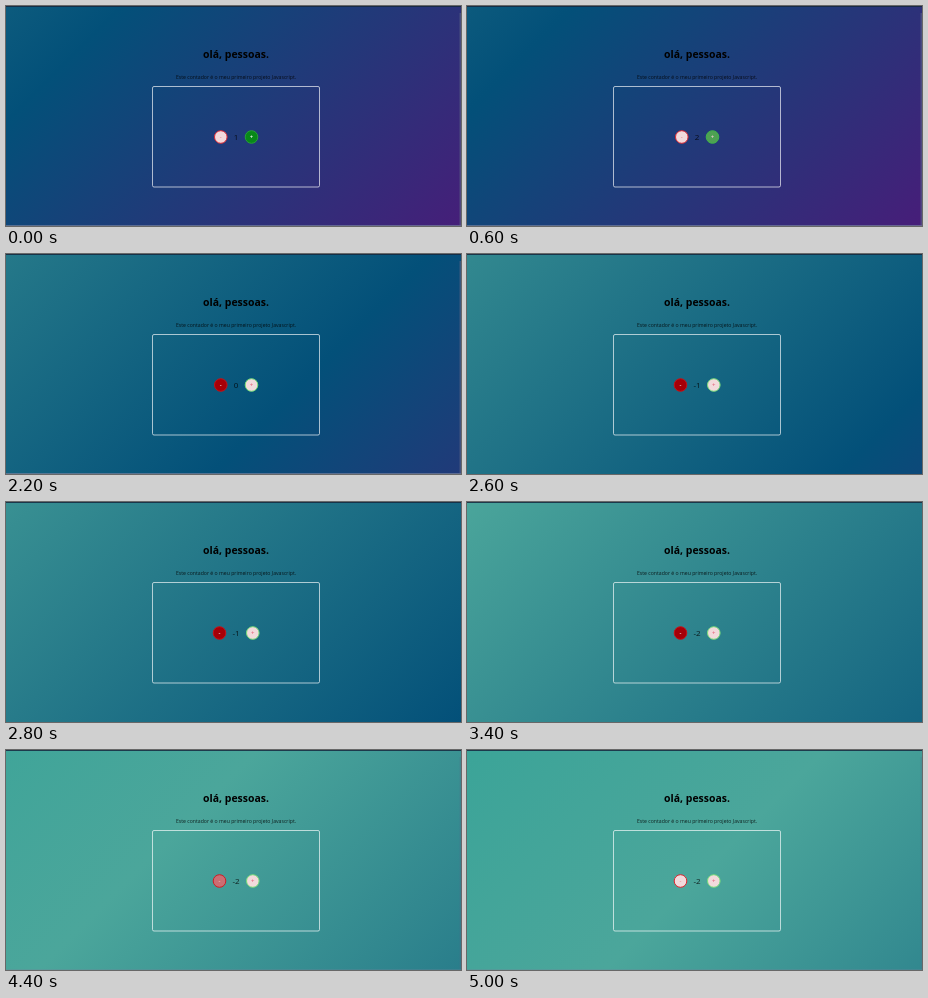
Recreate the animation shown at these times as an HTML page. Size 455 px wide and 220 px high, loop 5.2 s.

```html
<!DOCTYPE html>
<html lang="pt">
<head>
<meta charset="utf-8">
<style>
html, body { margin: 0; width: 100%; height: 100%; overflow: hidden; background: #0a5078; }
svg { display: block; width: 455px; height: 220px; }
text { font-family: "Open Sans", "Noto Sans", sans-serif; text-anchor: middle; }
</style>
</head>
<body>
<svg viewBox="0 0 455 220">
  <defs>
    <linearGradient id="sky" gradientUnits="userSpaceOnUse" x1="-900" y1="-900" x2="450" y2="450">
      <stop offset="0" stop-color="rgb(36,161,148)"/>
      <stop offset=".33333" stop-color="rgb(75,166,155)"/>
      <stop offset=".66667" stop-color="rgb(3,80,121)"/>
      <stop offset="1" stop-color="rgb(110,0,121)"/>
    </linearGradient>
  </defs>
  <rect width="455" height="220" fill="url(#sky)"/>
  <rect width="455" height="1" fill="#17283f" opacity=".85"/>
  <g id="edges">
    <rect y="219" width="455" height="1" fill="#77809c" opacity=".7"/>
    <rect x="453.5" y="7" width="1.5" height="212" fill="#5b6485" opacity=".6"/>
  </g>
  <text x="230" y="52" font-size="10.45" font-weight="700">olá, pessoas.</text>
  <text x="230" y="73.4" font-size="5.15" opacity=".8">Este contador é o meu primeiro projeto Javascript.</text>
  <rect x="146.5" y="80.5" width="167" height="100.5" rx="1.5" fill="none" stroke="#fff" stroke-opacity=".65"/>
  <text id="count" x="230" y="134" font-size="8" opacity=".8"></text>
  <g id="minus"><circle r="6.3"/><text y="2" font-size="6" font-weight="600">-</text></g>
  <g id="plus"><circle r="6.3"/><text y="2.1" font-size="6" font-weight="600">+</text></g>
</svg>
<script>
const LOOP = 5200, STEP = 200;
const SWING = 7500, TURN = 900;   // half period of the background and when it turns back
const $ = id => document.getElementById(id);
const counts = [[0, 1], [600, 2], [1800, 1], [2200, 0], [2600, -1], [3200, -2]];
const minusHover = [[1200, 0], [1400, .85], [1600, 1], [4200, 1], [4600, 0]];
const plusHover = [[0, 1], [400, 1], [600, .7], [800, 1], [1000, 1], [1300, 0]];

// CSS "ease": cubic-bezier(.25, .1, .25, 1)
function ease(x) {
  const curve = (a, b, s) => 3 * a * s * (1 - s) ** 2 + 3 * b * s * s * (1 - s) + s ** 3;
  let lo = 0, hi = 1;
  for (let i = 0; i < 24; i++) {
    const mid = (lo + hi) / 2;
    if (curve(.25, .25, mid) < x) lo = mid; else hi = mid;
  }
  return curve(.1, 1, lo);
}

function ramp(keys, t) {
  if (t <= keys[0][0]) return keys[0][1];
  for (let i = 1; i < keys.length; i++) {
    const [t0, a] = keys[i - 1], [t1, b] = keys[i];
    if (t <= t1) return a + (b - a) * (t - t0) / (t1 - t0);
  }
  return keys[keys.length - 1][1];
}

const mix = (a, b, k) => `rgb(${a.map((v, i) => Math.round(v + (b[i] - v) * k))})`;

function drawButton(id, x, hover, look) {
  const button = $(id), [disc, sign] = button.children;
  button.setAttribute("transform", `translate(${x} 131)`);
  disc.setAttribute("fill", mix([242, 218, 220], look.fill, hover));
  disc.setAttribute("stroke", mix(look.rim, look.hotRim, hover));
  sign.setAttribute("fill", mix(look.sign, [255, 255, 255], hover));
}

const red = { fill: [166, 0, 8], rim: [222, 38, 48], hotRim: [196, 18, 24], sign: [232, 140, 145] };
const green = { fill: [8, 136, 24], rim: [120, 222, 120], hotRim: [38, 160, 54], sign: [228, 105, 125] };

function draw(t) {
  const swing = t < TURN ? 1 - ease((t - TURN + SWING) / SWING) : ease((t - TURN) / SWING);
  const shift = (105 + 1365 * swing) / 2;
  $("sky").setAttribute("gradientTransform", `translate(${shift} ${shift})`);

  const value = counts.filter(c => c[0] <= t).pop()[1];
  $("count").textContent = value;
  const gap = value < 0 ? 16.5 : 15.2;
  drawButton("minus", 230 - gap, ramp(minusHover, t), red);
  drawButton("plus", 230.3 + gap, ramp(plusHover, t), green);
  $("edges").setAttribute("opacity", t < 2600 ? 1 : t < 4200 ? 0 : .4);
}

const start = performance.now();
function tick() {
  const t = (performance.now() - start) % LOOP;
  draw(Math.floor(t / STEP) * STEP);
  requestAnimationFrame(tick);
}
tick();
</script>
</body>
</html>
```
